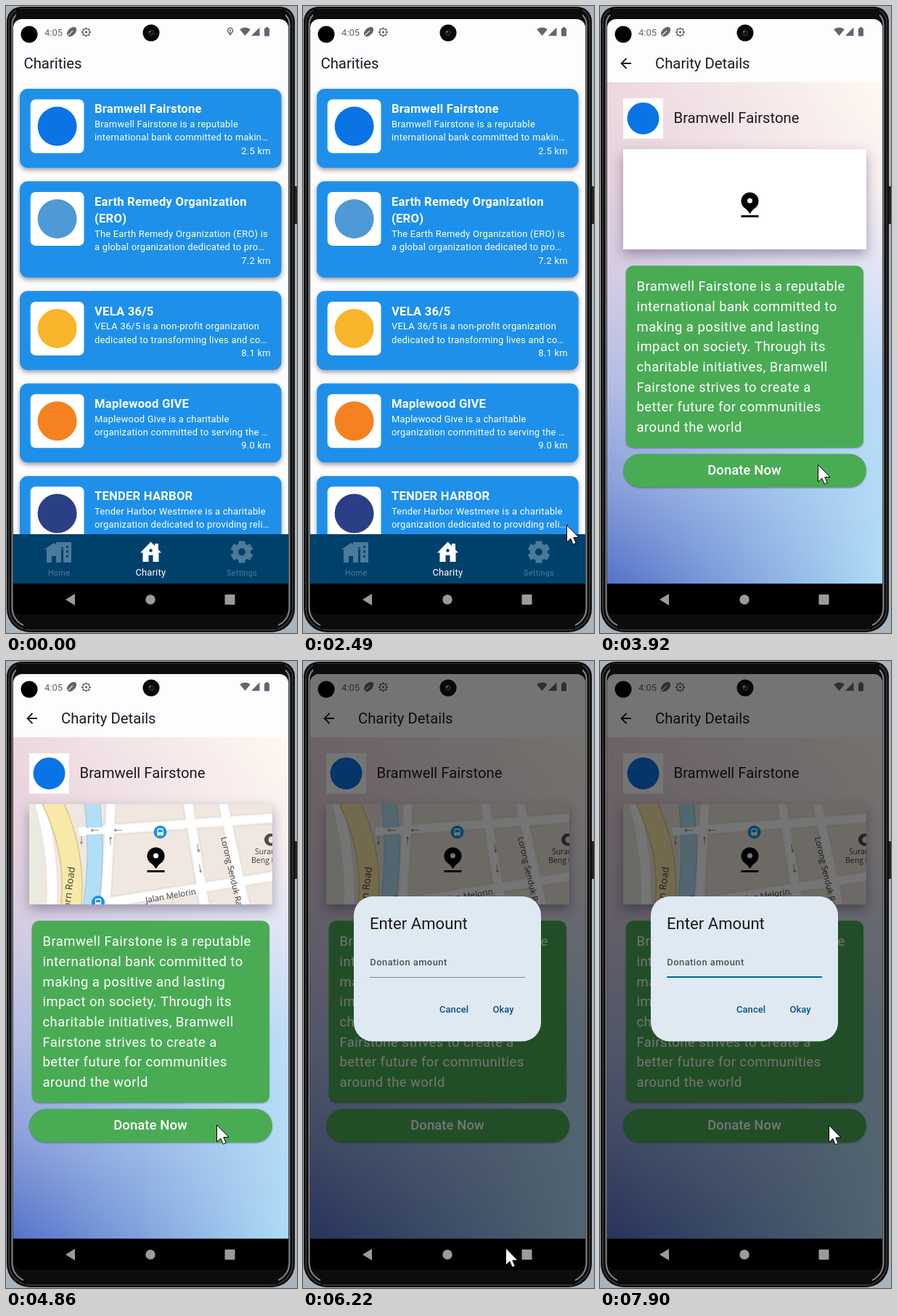
An HTML page with a canvas that plays this animation: 401x863 px, repeating every 8000 ms.

```html
<!DOCTYPE html>
<html lang="en">
<head>
<meta charset="utf-8">
<title>Charities</title>
<style>
html, body { margin: 0; width: 100%; height: 100%; overflow: hidden; background: #000; }
canvas { display: block; width: 401px; height: 863px; }
</style>
</head>
<body>
<canvas id="stage"></canvas>
<script>
const W = 401, H = 863, LOOP = 8000;
const DP = 0.9225; // stage pixels per app unit
const SCREEN = { x: 10, y: 18, w: 379, h: 777 };
const stage = document.getElementById('stage');
const ratio = window.devicePixelRatio || 1;
stage.width = W * ratio;
stage.height = H * ratio;
const ctx = stage.getContext('2d');

const INK = '#1b1b1f', BLUE = '#1e90ea', GREEN = '#4aab55', PAPER = '#fdfcff';
const ORG = 'Bramwell Fairstone', ORG_COLOR = '#0a74e6';

const mix = (a, b, k) => a + (b - a) * k;
const progress = (t, from, to) => Math.max(0, Math.min(1, (t - from) / (to - from)));

function text(str, x, y, size, o = {}) {
  ctx.font = `${o.weight || 400} ${size}px ${o.family || 'Roboto'}, sans-serif`;
  ctx.letterSpacing = (o.spacing || 0) + 'px';
  ctx.textAlign = o.align || 'left';
  ctx.fillStyle = o.color || INK;
  ctx.fillText(str, x, y);
}

function rect(x, y, w, h, color) {
  ctx.fillStyle = color;
  ctx.fillRect(x, y, w, h);
}

function box(x, y, w, h, r, color) {
  ctx.beginPath();
  ctx.roundRect(x, y, w, h, r);
  ctx.fillStyle = color;
  ctx.fill();
}

function frame(inset, r, color, width) {
  ctx.beginPath();
  ctx.roundRect(inset, inset, W - 2 - 2 * inset, H - 2 * inset, r);
  ctx.strokeStyle = color;
  ctx.lineWidth = width;
  ctx.stroke();
}

function circle(x, y, r, color) {
  ctx.beginPath();
  ctx.arc(x, y, r, 0, Math.PI * 2);
  ctx.fillStyle = color;
  ctx.fill();
}

function trace(points) {
  ctx.beginPath();
  for (const p of points) ctx.lineTo(...p);
}

function poly(points, color) {
  trace(points);
  ctx.closePath();
  ctx.fillStyle = color;
  ctx.fill();
}

function line(points, color, width) {
  trace(points);
  ctx.strokeStyle = color;
  ctx.lineWidth = width;
  ctx.stroke();
}

const roof = (x, y, w, h, color) => poly([[x - w / 2, y + h], [x, y], [x + w / 2, y + h]], color);

function withShadow(color, blur, dy, draw) {
  ctx.save();
  ctx.shadowColor = color;
  ctx.shadowBlur = blur * ratio;
  ctx.shadowOffsetY = dy * ratio;
  draw();
  ctx.restore();
}

function at(x, y, angle, draw) {
  ctx.save();
  ctx.translate(x, y);
  ctx.rotate(angle * Math.PI / 180);
  draw();
  ctx.restore();
}

function gear(x, y, r, hole, teeth, color, tooth) {
  ctx.save();
  ctx.beginPath();
  ctx.rect(x - r, y - r, 2 * r, 2 * r);
  ctx.arc(x, y, hole, 0, Math.PI * 2);
  ctx.clip('evenodd');
  circle(x, y, r * 0.78, color);
  for (let i = 0; i < teeth; i++) {
    at(x, y, i * 360 / teeth, () => box(-tooth / 2, -r, tooth, r * 0.6, 1, color));
  }
  ctx.restore();
}

function phone() {
  rect(0, 0, W, H, '#a9b4bf');
  box(397, 248, 4, 52, 1, '#242424');
  box(1, 1, 397, 861, [20, 20, 32, 32], '#0c0c0c');
  frame(4, [18, 18, 30, 30], '#3c3c3c', 1.5);
  frame(8.5, [16, 16, 26, 26], '#858585', 2);
  rect(14, 4, 371, 14, '#0c0c0c');
  rect(24, 838, 351, 20, '#0c0c0c');
}

function systemNav() {
  const grey = '#9b9b9b';
  rect(10, 795, 379, 43, '#000');
  at(88.5, 817, -90, () => roof(0, -6.5, 16, 13, grey));
  circle(199, 817, 6.7, grey);
  box(301.5, 810, 14, 14, 1, grey);
}

function statusBar(t) {
  const grey = '#66666a';
  text('4:05', 53, 40.5, 13, { color: grey });
  at(90.5, 35.5, 45, () => {
    ctx.beginPath();
    ctx.ellipse(0, 0, 5, 8, 0, 0, Math.PI * 2);
    ctx.fillStyle = grey;
    ctx.fill();
    line([[0, 9], [0, -2]], PAPER, 1);
  });
  gear(110.5, 36, 6.7, 4, 8, grey, 2);
  circle(110.5, 36, 1.7, grey);
  if (t < 360) {
    roof(309, -40.5, 0, 0, grey);
    at(309, 41, 180, () => roof(0, 0, 7, 6, grey));
    circle(309, 33.8, 4.3, grey);
    circle(309, 33.8, 2.8, PAPER);
    circle(309, 33.8, 1.3, grey);
  }
  ctx.beginPath();
  ctx.moveTo(329.5, 41);
  ctx.arc(329.5, 41, 11.5, -Math.PI * 0.72, -Math.PI * 0.28);
  ctx.fillStyle = grey;
  ctx.fill();
  poly([[338, 41], [349.5, 41], [349.5, 29.5]], grey);
  box(356, 30.5, 7, 11, 1, grey);
  rect(358, 29, 3, 2, grey);
}

function camera() {
  circle(32, 39, 11.5, '#000');
  circle(200, 37, 11.5, '#080809');
  circle(200, 37, 4.2, '#20252d');
  circle(200, 37, 2, '#0b0d12');
  circle(198.5, 35.5, 1, '#98a2ac');
}

const cards = [
  { title: [ORG], logo: ORG_COLOR, km: 2.5,
    body: [ORG + ' is a reputable', 'international bank committed to makin…'] },
  { title: ['Earth Remedy Organization', '(ERO)'], logo: '#4f9ad4', km: 7.2,
    body: ['The Earth Remedy Organization (ERO) is', 'a global organization dedicated to pro…'] },
  { title: ['VELA 36/5'], logo: '#f8b52c', km: 8.1,
    body: ['VELA 36/5 is a non-profit organization', 'dedicated to transforming lives and co…'] },
  { title: ['Maplewood GIVE'], logo: '#f58220', km: 9,
    body: ['Maplewood Give is a charitable', 'organization committed to serving the …'] },
  { title: ['TENDER HARBOR'], logo: '#2b3f86', km: 9.6,
    body: ['Tender Harbor Westmere is a charitable', 'organization dedicated to providing reli…'] }
];

function card({ title, body, km, logo }, y) {
  const height = 85 + 23.7 * title.length;
  withShadow('rgba(0,0,0,.38)', 6, 3, () => box(19, y, 360.5, height, 11, BLUE));
  box(33.7, y + 14.6, 73.8, 74, 7, '#fff');
  circle(70.6, y + 51.6, 27, logo);
  const style = { spacing: 0.23, color: '#fff' };
  let base = y + 33.4;
  for (const row of title) {
    text(row, 122, base, 18 * DP, { ...style, weight: 700 });
    base += 23.7;
  }
  base -= 4.2;
  for (const row of body) {
    text(row, 122, base, 14 * DP, style);
    base += 18.45;
  }
  text(km.toFixed(1) + ' km', 364.7, base, 14 * DP, { ...style, align: 'right' });
  return y + height + 18.6;
}

function tabBar() {
  const dim = '#4b7a9a', bar = '#00416b', lit = '#fff';
  rect(10, 727, 379, 68, bar);

  rect(69, 738, 21, 28, dim);
  rect(66, 745, 13, 21, bar);
  roof(66, 739, 26, 9, dim);
  rect(56, 747, 20, 19, dim);
  rect(63, 757, 6, 9, bar);
  for (let y = 743; y < 760; y += 6.5) rect(83, y, 3, 3, bar);

  roof(199.5, 737.5, 29, 15, lit);
  rect(205, 740, 5, 10, lit);
  rect(188.5, 750, 22, 15, lit);
  rect(196.5, 756, 6, 9, bar);
  circle(199.5, 749.5, 2.2, bar);

  gear(325, 751.5, 15.3, 5, 6, dim, 9);

  const label = (s, x, size, color) => text(s, x, 784, size * DP, { color, spacing: 0.2, align: 'center' });
  label('Home', 73, 12, dim);
  label('Charity', 199.3, 14, lit);
  label('Settings', 325, 12, dim);
}

function listPage(t) {
  rect(SCREEN.x, SCREEN.y, SCREEN.w, SCREEN.h, PAPER);
  text('Charities', 24.5, 86, 22 * DP);
  cards.reduce((y, item) => card(item, y), 114);
  tabBar();
  statusBar(t);
}

// Soft backdrop: a cool vertical ramp on the left fading into a light one on the right.
function ramp(colors) {
  const layer = document.createElement('canvas');
  layer.width = 379;
  layer.height = 690;
  const c = layer.getContext('2d');
  const g = c.createLinearGradient(0, 0, 0, 690);
  colors.forEach((color, i) => g.addColorStop(i / (colors.length - 1), color));
  c.fillStyle = g;
  c.fillRect(0, 0, 379, 690);
  return layer;
}

const backdrop = ramp(['#edd8e0', '#e6d2de', '#d3cbe3', '#b4bde4', '#8b9fdb', '#5672c8']);
{
  const light = ramp(['#fef8f1', '#faf0ef', '#dde4f5', '#bbdcf6', '#b4dcf6', '#b0dbf5']);
  const c = light.getContext('2d');
  const fade = c.createLinearGradient(0, 0, 379, 0);
  fade.addColorStop(0, 'transparent');
  fade.addColorStop(1, '#000');
  c.globalCompositeOperation = 'destination-in';
  c.fillStyle = fade;
  c.fillRect(0, 0, 379, 690);
  backdrop.getContext('2d').drawImage(light, 0, 0);
}

function bus(x, y) {
  const blue = '#1495e0';
  circle(x, y, 9, blue);
  box(x - 4.2, y - 5, 8.4, 10, 1.5, '#fff');
  rect(x - 3, y - 3.3, 6, 3.5, blue);
  rect(x - 1.5, y + 4, 3, 1, blue);
}

function arrow(x, y, angle) {
  at(x, y, angle, () => {
    line([[0, -4], [0, 6]], '#8f8f8f', 1);
    roof(0, -6, 4.4, 4, '#8f8f8f');
  });
}

function bend(x, bulge, end, color, width) {
  ctx.beginPath();
  ctx.moveTo(x, 190);
  ctx.quadraticCurveTo(x + bulge, 265, x + end, 342);
  ctx.strokeStyle = color;
  ctx.lineWidth = width;
  ctx.stroke();
}

function map() {
  ctx.save();
  ctx.beginPath();
  ctx.rect(32, 197, 335, 138);
  ctx.clip();
  rect(32, 197, 335, 138, '#efe7e0');

  const streets = [
    [[145, 190], [137, 340]], [[250, 190], [274, 340]], [[298, 190], [330, 340]],
    [[100, 235], [370, 216]], [[130, 334], [370, 296]]
  ];
  for (const [color, width] of [['#ddd6cf', 16], ['#f6f3ef', 14], ['#fff', 10]]) {
    for (const street of streets) line(street, color, width);
  }

  rect(32, 197, 18, 138, '#e9ebdf');
  bend(45, 22, 18, '#fff', 13);
  bend(118, 10, -2, '#93c3de', 22);
  bend(118, 10, -2, '#b3dff6', 20);
  bend(62, 37, 27, '#d9c58f', 29);
  bend(62, 37, 27, '#f9e9a8', 26);
  line([[104, 235], [150, 232]], '#fff', 9);

  for (const x of [122, 154]) arrow(x, 233, -90);
  for (const y of [258, 286]) arrow(239 + y / 10, y, 170);
  arrow(144, 247, 0);
  arrow(104, 247, 180);

  const label = (str, x, y, angle, size) =>
    at(x, y, angle, () => text(str, 0, 0, size, { family: 'Open Sans', color: '#3b3b3b' }));
  label('orn Road', 88, 341, -83, 13.5);
  label('Jalan Melorin', 193, 333, -10, 11.5);
  label('Lorong Senduk Ra', 296, 243, 77, 11.5);
  label('Surau', 343, 266, 0, 10.5);
  label('Beng L', 338, 278, 0, 10.5);
  circle(364.5, 246, 8.5, '#4c4c4c');
  circle(366, 246, 4.5, '#efe7e0');
  bus(212.5, 235.5);
  bus(127, 332);
  ctx.restore();
}

function mapPin() {
  at(206.5, 286, 180, () => roof(0, 0, 21, 14, '#000'));
  circle(206.5, 268.5, 12, '#000');
  circle(206.5, 268, 3.5, '#fff');
  rect(194.5, 288, 24, 2.8, '#000');
}

const story = [
  ORG + ' is a reputable', 'international bank committed to', 'making a positive and lasting',
  'impact on society. Through its', 'charitable initiatives, Bramwell', 'Fairstone strives to create a',
  'better future for communities', 'around the world'
];

function detailPage(t) {
  rect(10, 18, 379, 87, PAPER);
  ctx.drawImage(backdrop, 10, 105);
  line([[43, 79], [29.5, 79]], INK, 1.8);
  line([[36.5, 72], [29.5, 79], [36.5, 86]], INK, 1.8);
  text('Charity Details', 76, 86, 22 * DP);
  rect(32, 127, 55, 55.5, '#fff');
  circle(59.5, 154.7, 22, ORG_COLOR);
  text(ORG, 101.5, 161.3, 22 * DP);
  withShadow('rgba(70,60,100,.45)', 16, 7, () => rect(32, 197, 335, 138, '#fff'));
  ctx.globalAlpha = progress(t, 4115, 4220);
  map();
  ctx.globalAlpha = 1;
  mapPin();
  withShadow('rgba(0,0,0,.3)', 2, 1, () => box(35.7, 357.5, 327.3, 250.5, 10, GREEN));
  story.forEach((row, i) => text(row, 50.5, 392.3 + i * 27.68, 20 * DP, { spacing: 0.46, color: '#fff' }));
  withShadow('rgba(0,0,0,.35)', 2, 1, () => box(32, 616.5, 335, 46, 23, GREEN));
  text('Donate Now', 199, 645.3, 20 * DP, { weight: 500, spacing: 0.1, color: '#fff', align: 'center' });
  statusBar(t);
}

function dialog(t) {
  rect(SCREEN.x, SCREEN.y, SCREEN.w, SCREEN.h, 'rgba(0,0,0,.54)');
  box(70, 324, 258, 199.5, 26, '#dfe9f2');
  text('Enter Amount', 92, 368.8, 24 * DP);
  text('Donation amount', 92.3, 419, 14 * DP, { weight: 500, spacing: 0.46, color: '#4b545c' });
  const focus = progress(t, 7680, 7900);
  rect(92.3, 435, 213.7, 1, '#7d868e');
  ctx.globalAlpha = focus;
  rect(92.3, 434, 213.7, 2, '#00629e');
  ctx.globalAlpha = 1;
  const action = { weight: 500, spacing: 0.1, color: '#0b4f80' };
  text('Cancel', 188, 484, 14 * DP, action);
  text('Okay', 261.5, 484, 14 * DP, action);
}

// Pointer moves: start, end, and the point reached
const moves = [
  [740, 950, 324, 205], [1620, 1960, 360, 835], [1960, 2090, 363, 714], [3020, 3810, 321, 650],
  [3860, 3920, 300, 631], [4770, 4860, 290, 638], [5680, 5800, 279, 807.5],
  [6600, 6780, 236, 406], [7010, 7110, 216, 390], [7110, 7370, 315, 638.5]
];

function pointer(t) {
  if (t < moves[0][0]) return;
  let x = 380, y = 235;
  for (const [from, to, px, py] of moves) {
    const k = progress(t, from, to);
    x = mix(x, px, k);
    y = mix(y, py, k);
  }
  at(x + 0.5, y + 0.5, 0, () => {
    const shape = [[0, 0], [0, 23.5], [5.3, 18.5], [8.8, 26.5], [12.7, 24.8], [9.3, 17.1], [16.5, 16.9], [0, 0]];
    poly(shape, '#fff');
    line(shape, '#000', 1);
  });
}

function draw(t) {
  ctx.setTransform(ratio, 0, 0, ratio, 0, 0);
  phone();
  ctx.save();
  ctx.beginPath();
  ctx.roundRect(10, 18, 379, 820, 12);
  ctx.clip();
  if (t < 2560) listPage(t);
  else detailPage(t);
  if (t >= 6220) dialog(t);
  systemNav();
  ctx.restore();
  camera();
  pointer(t);
}

const start = performance.now();
function tick() {
  draw((performance.now() - start) % LOOP);
  requestAnimationFrame(tick);
}
tick();
</script>
</body>
</html>
```
